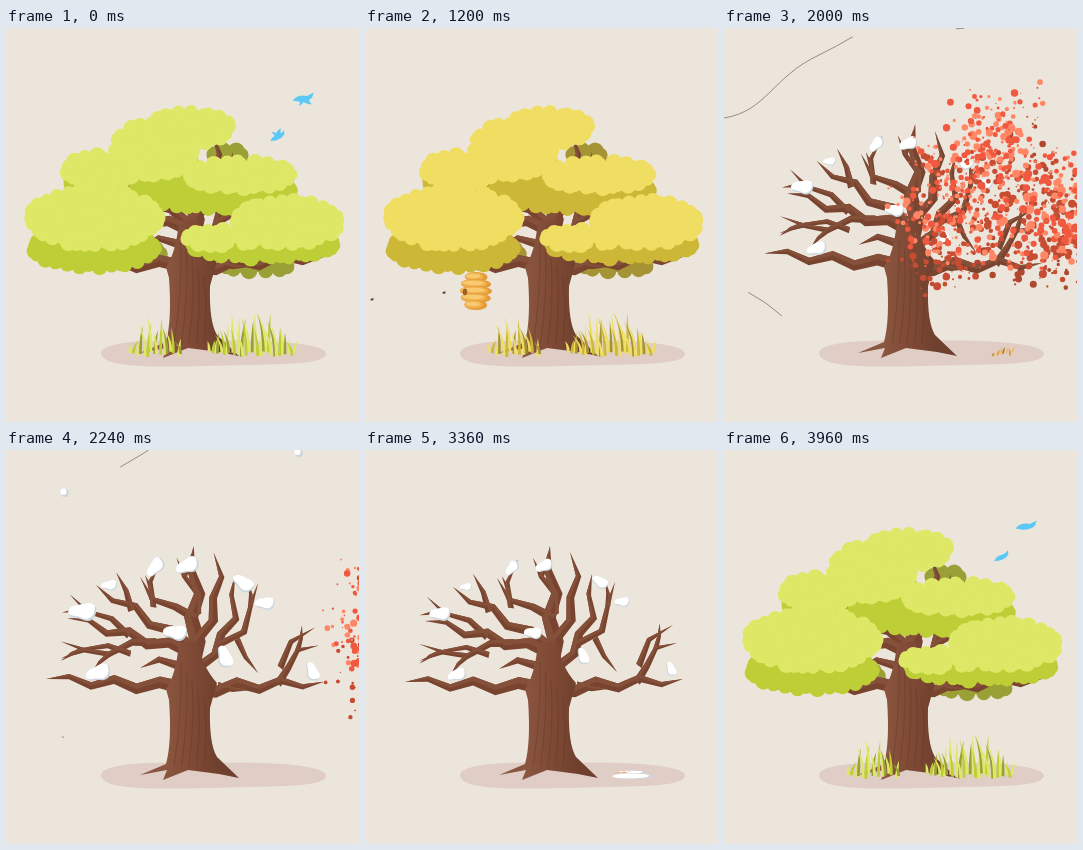
Write an HTML page with a canvas that moves like this. It is 353 px wide and 394 px high and loops after 4000 ms.

```html
<!DOCTYPE html>
<html lang="en">
<head>
<meta charset="utf-8">
<title>Tree through the seasons</title>
<style>
  html, body { margin: 0; width: 100%; height: 100%; overflow: hidden; background: #ece5db; }
  canvas { display: block; width: 353px; height: 394px; }
</style>
</head>
<body>
<canvas id="stage" width="353" height="394"></canvas>
<script>
const ctx = document.getElementById('stage').getContext('2d');
const LOOP = 4000, STEP = 40, TAU = Math.PI * 2, GOLDEN = 2.39996;

let seed = 11;
const rnd = () => (seed = (seed * 16807) % 2147483647) / 2147483647;
const spread = size => (rnd() - .5) * size;
const clamp = v => Math.max(0, Math.min(1, v));
const ramp = (t, from, to) => clamp((t - from) / (to - from));
const easeOut = v => 1 - (1 - clamp(v)) ** 3;
const mix = (a, b, u) => a + (b - a) * u;

function fill(path, color) {
  ctx.fillStyle = color;
  ctx.fill(path);
}
function disc(x, y, rx, ry, color) {
  ctx.fillStyle = color;
  ctx.beginPath();
  ctx.ellipse(x, y, rx, ry, 0, 0, TAU);
  ctx.fill();
}
function placed(x, y, angle, sx, sy, draw) {
  ctx.save();
  ctx.translate(x, y);
  ctx.rotate(angle);
  ctx.scale(sx, sy);
  draw();
  ctx.restore();
}

// Leaf tones: summer, late summer, autumn, late autumn.
const seasons = [300, 1200, 1680, 1960];
const tones = {
  light: ['dfe866', 'f0de62', 'f8b962', 'ff8766'],
  warm: ['dfe866', 'f0de62', 'f8b962', 'f0583f'],
  dark: ['bece36', 'cdb736', 'd6992e', 'c64c32'],
  back: ['9ba036', 'a59436', 'a17f3a', 'b04830']
};
const channels = hex => [0, 2, 4].map(i => parseInt(hex.slice(i, i + 2), 16));
function palette(t) {
  if (t > 3000) t = 0;
  const i = t < seasons[1] ? 0 : t < seasons[2] ? 1 : 2;
  const u = ramp(t, seasons[i], seasons[i + 1]);
  const colors = {};
  for (const name in tones) {
    const a = channels(tones[name][i]), b = channels(tones[name][i + 1]);
    colors[name] = `rgb(${a.map((v, k) => Math.round(mix(v, b[k], u)))})`;
  }
  return colors;
}

// Foliage: each clump is an oval with a scalloped rim and a spiral of discs inside.
const clumps = [];
function clump(shade, cx, cy, rx, ry) {
  const dots = [], w = rx - 7, h = ry - 7;
  const add = (x, y, r) => dots.push({
    x, y, r,
    start: 1440 + (x - 20) * .75 + spread(110),
    shrink: .5 + rnd() * .42,
    drift: spread(64)
  });
  const inner = Math.round(w * h / 13);
  for (let i = 0; i < inner; i++) {
    const d = Math.sqrt(i / inner), a = i * GOLDEN;
    add(cx + w * d * Math.cos(a), cy + h * d * Math.sin(a), 5.5 + rnd() * 2);
  }
  const rim = Math.round((w + h) * Math.PI / 10);
  for (let i = 0; i < rim; i++) {
    const a = (i + spread(.5)) / rim * TAU;
    add(cx + w * Math.cos(a), cy + h * Math.sin(a), 6.3 + rnd() * 2.4);
  }
  clumps.push({ shade, dots, cx, cy });
}
clump('back', 222, 127, 20, 12);
clump('back', 250, 238, 38, 12);
clump('back', 143, 226, 18, 14);
clump('dark', 207, 163, 85, 24);
clump('dark', 88, 153, 31, 17);
clump('light', 148, 121, 46, 32);
clump('light', 184, 100, 46, 23);
clump('light', 95, 142, 40, 22);
clump('light', 235, 147, 57, 20);
clump('dark', 88, 221, 67, 25);
clump('light', 88, 190, 70, 34);
clump('dark', 257, 217, 78, 20);
clump('light', 215, 210, 41, 15);
clump('light', 282, 194, 57, 28);

function drawFoliage(t, colors, back) {
  const growing = t >= 3400;
  if (!growing && t > 2400) return;
  clumps.forEach(({ shade, dots, cx, cy }, i) => {
    if ((shade === 'back') !== back) return;
    const size = growing ? easeOut((t - 3400 - i * 9) / 430) : 1;
    if (size <= 0) return;
    const layers = shade === 'light' ? ['light', 'warm'] : [shade];
    layers.forEach((tone, layer) => {
      ctx.fillStyle = colors[tone];
      ctx.beginPath();
      for (let k = layer; k < dots.length; k += layers.length) {
        const d = dots[k], age = growing ? 0 : Math.max(0, t - d.start), q = clamp(age / 420);
        const x = cx + (d.x - cx) * size + 5.2e-4 * age * age;
        const y = cy + (d.y - cy) * size + d.drift * q * q;
        const r = d.r * size * (1 - q ** 1.3 * d.shrink);
        ctx.moveTo(x + r, y);
        ctx.arc(x, y, r, 0, TAU);
      }
      ctx.fill();
    });
  });
}

// A limb zigzags along a bowed line and tapers to its tip; stout ones fork once.
const limbs = [];
function limb(x0, y0, x1, y1, width, bow = 0) {
  const dx = x1 - x0, dy = y1 - y0, len = Math.hypot(dx, dy);
  const nx = -dy / len, ny = dx / len;
  const count = Math.max(2, Math.round(len / 22));
  const axis = [], rims = [[], []];
  for (let i = 0; i <= count; i++) {
    const u = i / count;
    const kink = i % count ? (i % 2 ? 4 : -4) * Math.min(1, len / 70) : 0;
    const off = bow * Math.sin(u * Math.PI) + kink, half = width / 2 * (1 - u) ** .5;
    const x = x0 + dx * u + nx * off, y = y0 + dy * u + ny * off;
    axis.push([x, y]);
    rims[0].push([x + nx * half, y + ny * half]);
    rims[1].push([x - nx * half, y - ny * half]);
  }
  const shape = (a, b) => new Path2D('M' + [...a, ...b.slice().reverse()].join('L') + 'Z');
  limbs.push({ body: shape(...rims), lit: shape(axis, rims[dx < 0 ? 0 : 1]) });
  if (width > 5 && width < 11 && len > 55) {
    const [fx, fy] = axis[Math.ceil(count / 2)];
    const angle = Math.atan2(dy, dx) + (limbs.length % 2 ? .65 : -.65);
    limb(fx, fy, fx + 25 * Math.cos(angle), fy + 25 * Math.sin(angle), 5);
  }
}
limb(176, 238, 40, 232, 13);
limb(172, 216, 134, 219, 9, 5);
limb(182, 202, 60, 171, 12);
limb(150, 193, 54, 211, 8);
limb(124, 205, 54, 194, 6);
limb(122, 187, 62, 147, 7);
limb(182, 196, 88, 137, 11);
limb(124, 162, 108, 124, 7);
limb(185, 215, 185, 96, 18, 3);
limb(190, 165, 168, 108, 8, 5);
limb(188, 168, 132, 128, 9, -8);
limb(146, 158, 153, 109, 6, -10);
limb(190, 190, 205, 102, 11, 12);
limb(191, 218, 227, 124, 11, 14);
limb(212, 194, 250, 132, 8, 12);
limb(230, 188, 252, 222, 6);
limb(188, 239, 318, 229, 13);
limb(272, 232, 312, 193, 8, -9);
limb(274, 216, 308, 175, 7, -12);
limb(212, 235, 243, 239, 7);

const trunk = new Path2D('M134,325L160,314Q166,292 163,250L160,239Q170,225 173,193L192,191Q196,217 211,233L204,258Q203,294 211,307L233,328 213,324 182,320 157,330 161,320Z');
const bark = ctx.createLinearGradient(160, 0, 213, 0);
bark.addColorStop(0, '#8b5640');
bark.addColorStop(.5, '#7f4a35');
bark.addColorStop(1, '#6e402d');

const lean = t => .045 * ramp(t, 1400, 1640) * (1 - ramp(t, 2040, 2400));
function withLean(t, draw) {
  placed(185, 235, lean(t), 1, 1, () => { ctx.translate(-185, -235); draw(); });
}
function drawTree(t) {
  withLean(t, () => {
    for (const l of limbs) fill(l.body, '#78442f');
    for (const l of limbs) fill(l.lit, '#85503a');
  });
  fill(trunk, bark);
  ctx.strokeStyle = 'rgba(96,52,36,.35)';
  ctx.lineWidth = 1.2;
  for (let i = 0; i < 5; i++) {
    const x = 171 + i * 6.5;
    ctx.beginPath();
    ctx.moveTo(x + 4 - i, 212 + i * 9);
    ctx.quadraticCurveTo(x + 5, 268, x - 3 + i, 316);
    ctx.stroke();
  }
}

// Grass
const blades = [];
function tuft(from, to, count, tall) {
  for (let i = 0; i < count; i++) {
    const u = (i + rnd() * .7) / count;
    blades.push({
      x: mix(from, to, u), y: 323 + rnd() * 6,
      h: 10 + tall * Math.sin(u * Math.PI) * (.35 + rnd() * .65),
      bend: spread(15) - 3,
      tone: ['light', 'dark', 'light', 'back'][i % 4]
    });
  }
}
tuft(124, 177, 16, 34);
tuft(203, 290, 31, 43);

function drawGrass(t) {
  if (t > 2100 && t < 3400) return;
  const colors = palette(t > 3000 ? 0 : Math.min(t, 1680));
  const wind = 12 * ramp(t, 1440, 1760) - 3 * ramp(t, 600, 1200) * (1 - ramp(t, 1200, 1440));
  for (const b of blades) {
    const fade = 1680 + 230 * ((b.x - 120) / 165) ** 3;
    const size = t >= 3400 ? easeOut((t - 3440) / 480) : 1 - ramp(t, fade, fade + 170);
    if (size <= 0) continue;
    const h = b.h * size, gust = t < 3000 ? wind : 0;
    const tip = b.x + (b.bend + gust * b.h / 40 + Math.sin(t * TAU / 1000 + b.x) * .6) * size;
    ctx.fillStyle = colors[b.tone];
    ctx.beginPath();
    ctx.moveTo(b.x - 1.4 * size, b.y);
    ctx.quadraticCurveTo(b.x - 1.5, b.y - h * .55, tip, b.y - h);
    ctx.quadraticCurveTo(b.x + 1.8, b.y - h * .5, b.x + 1.4 * size, b.y);
    ctx.fill();
  }
}

// Birds circle out of the crown and back into it.
const wing = new Path2D('M-3,0Q0,-7 8,-8Q5,-4 5,1Z');
const birdBody = new Path2D('M-11,2L-7,-1Q-2,-3 4,-1L11,-4 9,1Q4,5 -4,4Z');
function drawBird(cx, cy, radius, angle, tilt, flap, size) {
  placed(cx + radius * Math.cos(angle), cy + radius * Math.sin(angle), tilt, size, size, () => {
    fill(birdBody, '#5bc8f5');
    for (const side of [1, -.6]) placed(0, 0, 0, side, flap, () => fill(wing, '#5bc8f5'));
  });
}
function drawBirds(t) {
  const at = t < 1000 ? t + LOOP : t, age = at - 3980;
  if (age > -370 && age < 580) drawBird(265, 101, 45, -.69 - age * .00433, -.1, -Math.cos((age - 20) * TAU / 160), 1);
  if (age > -400 && age < 180) drawBird(282, 131, 25, -1.88 - age * .0063, -.4, Math.cos((age - 20) * TAU / 190), .78);
}

// Beehive made of stacked rings
function drawHive(t) {
  if (t < 640 || t > 1640) return;
  const y = 262 - 50 * (1 - easeOut((t - 640) / 260)) - 50 * ramp(t, 1380, 1600) ** 2;
  placed(111, y, Math.sin(t / 90) * .025, 1, 1, () => {
    for (let i = 0; i < 5; i++) {
      const dy = i * 7 - 13, w = 16 * Math.sqrt(1 - ((dy - 1) / 20) ** 2);
      disc(0, dy, w, 5, '#e59a38');
      disc(-2, dy - .5, w - 2, 4, '#efb04c');
      disc(-3, dy - 1, w - 4, 2.2, '#f8c970');
    }
    disc(-11, 2, 2.3, 3.4, '#a05f25');
  });
}
function drawBees(t) {
  for (let i = 0; i < 3; i++) {
    const age = t - 890 - i * 240;
    if (age < 0 || age > 340) continue;
    const x = 100 - age * .3, y = 264 + (i % 2 ? 0 : 7) * clamp(age / 250) + Math.sin(age / 45) * .8;
    disc(x, y, 1.6, 1, '#453c30');
    disc(x + 1, y - 1, .8, .7, '#8f887d');
  }
}

// Wind lines are revealed by a head and erased by a tail: start time, speed.
const gusts = [
  { path: 'M-40,30C-10,30 3,40 3,58C3,74 -12,82 -25,82C-42,84 -20,94 0,90C43,83 48,49 95,27Q130,10 160,-12', head: [1512, .6], tail: [1780, .6] },
  { path: 'M-40,236Q-15,246 15,260Q38,270 58,288', head: [1310, .165], tail: [1560, .16] },
  { path: 'M205,-12Q228,4 240,0Q280,-18 320,-20', head: [1920, .5], tail: [1940, .5] }
].map(g => ({ ...g, path: new Path2D(g.path) }));
function drawWind(t) {
  if (t < 1600 || t > 2260) return;
  ctx.strokeStyle = '#77705f';
  ctx.lineWidth = .75;
  for (const { path, head, tail } of gusts) {
    const to = (t - head[0]) * head[1], from = Math.max(0, (t - tail[0]) * tail[1]);
    if (to <= from) continue;
    ctx.setLineDash([to - from, 2000]);
    ctx.lineDashOffset = -from;
    ctx.stroke(path);
  }
  ctx.setLineDash([]);
}

// Snow lies on the limbs: x, y, width and tilt of each drift.
const drift = new Path2D('M-.5,.12C-.52,-.35 -.1,-.32 .08,-.46C.3,-.58 .52,-.42 .49,-.08C.48,.3 .32,.52 .08,.44C-.15,.28 -.47,.5 -.5,.12Z');
const drifts = [
  [75, 164, 42, .1], [101, 137, 24, 0], [147, 118, 32, -.75], [179, 116, 36, -.3], [235, 132, 34, .7],
  [257, 152, 30, .1], [168, 183, 36, .2], [218, 206, 34, 1.35], [92, 225, 38, -.2], [306, 219, 29, 1.3]
];
function drawDrifts(t) {
  const size = .53 * ramp(t, 1840, 2000) + .47 * ramp(t, 2100, 2600) - .5 * ramp(t, 2800, 3360) - .5 * ramp(t, 3360, 3540);
  if (size <= 0 || t > 3540) return;
  withLean(t, () => {
    for (const [x, y, w, a] of drifts) placed(x, y, a, w * size, w * .68 * size, () => {
      fill(drift, '#cbd6dd');
      ctx.clip(drift);
      ctx.translate(-.06, -.1);
      fill(drift, '#fff');
    });
  });
}
function drawFlakes(t) {
  for (let i = 0; i < 6; i++) {
    const x = 175 + (i % 2 ? 1 : -1) * 117 / (1 + Math.floor(i / 2));
    const y = (t - 2105 - i * 145) * .275 + 5;
    if (y < -5 || y > 160 - i * 4) continue;
    disc(x + 1, y + .8, 3.7, 4, '#cbd6dd');
    disc(x - .5, y - .5, 3, 3.2, '#fff');
  }
}

function ball(x, y, rx, ry) {
  ctx.save();
  disc(x, y, rx, ry, '#cbd6dd');
  ctx.clip();
  disc(x - rx * .22, y - ry * .16, rx, ry, '#fff');
  ctx.restore();
}
const carrot = new Path2D('M-22,-52L-9,-57Q-5,-57 -6,-53Q-7,-51 -10,-51Z');
function drawSnowman(t) {
  if (t < 2240 || t > 3540) return;
  const body = easeOut((t - 2240) / 260), head = easeOut((t - 2380) / 220);
  const melt = ramp(t, 2800, 3360), gone = ramp(t, 3360, 3540);
  placed(271 - 3 * melt, 329, 0, (1 - .1 * melt) * (1 - gone), (1 - .88 * melt) * (1 - gone), () => {
    ball(0, -23 * body, 23 * body, 23 * body);
    if (head > 0) placed(0, -42, 0, head, head, () => {
      ctx.translate(0, 42);
      ball(-1, -56, 15, 14);
      for (const x of [-10, -5]) disc(x, -61, 1.3, 1.4, '#2d2926');
      fill(carrot, '#f58a1f');
    });
  });
}

const ground = new Path2D('M95,326C94,315 130,311 200,313C270,311 321,316 320,326C318,338 265,336 200,338C125,340 98,337 95,326Z');
function draw(t) {
  const colors = palette(t);
  ctx.fillStyle = '#ece5db';
  ctx.fillRect(0, 0, 353, 394);
  fill(ground, '#dfcdc6');
  drawWind(t);
  drawFoliage(t, colors, true);
  drawTree(t);
  drawDrifts(t);
  drawHive(t);
  drawBirds(t);
  drawFoliage(t, colors, false);
  drawBees(t);
  drawGrass(t);
  drawSnowman(t);
  drawFlakes(t);
}

const began = performance.now();
function frame() {
  const t = (performance.now() - began) % LOOP;
  draw(Math.floor(t / STEP) * STEP);
  requestAnimationFrame(frame);
}
frame();
</script>
</body>
</html>
```
